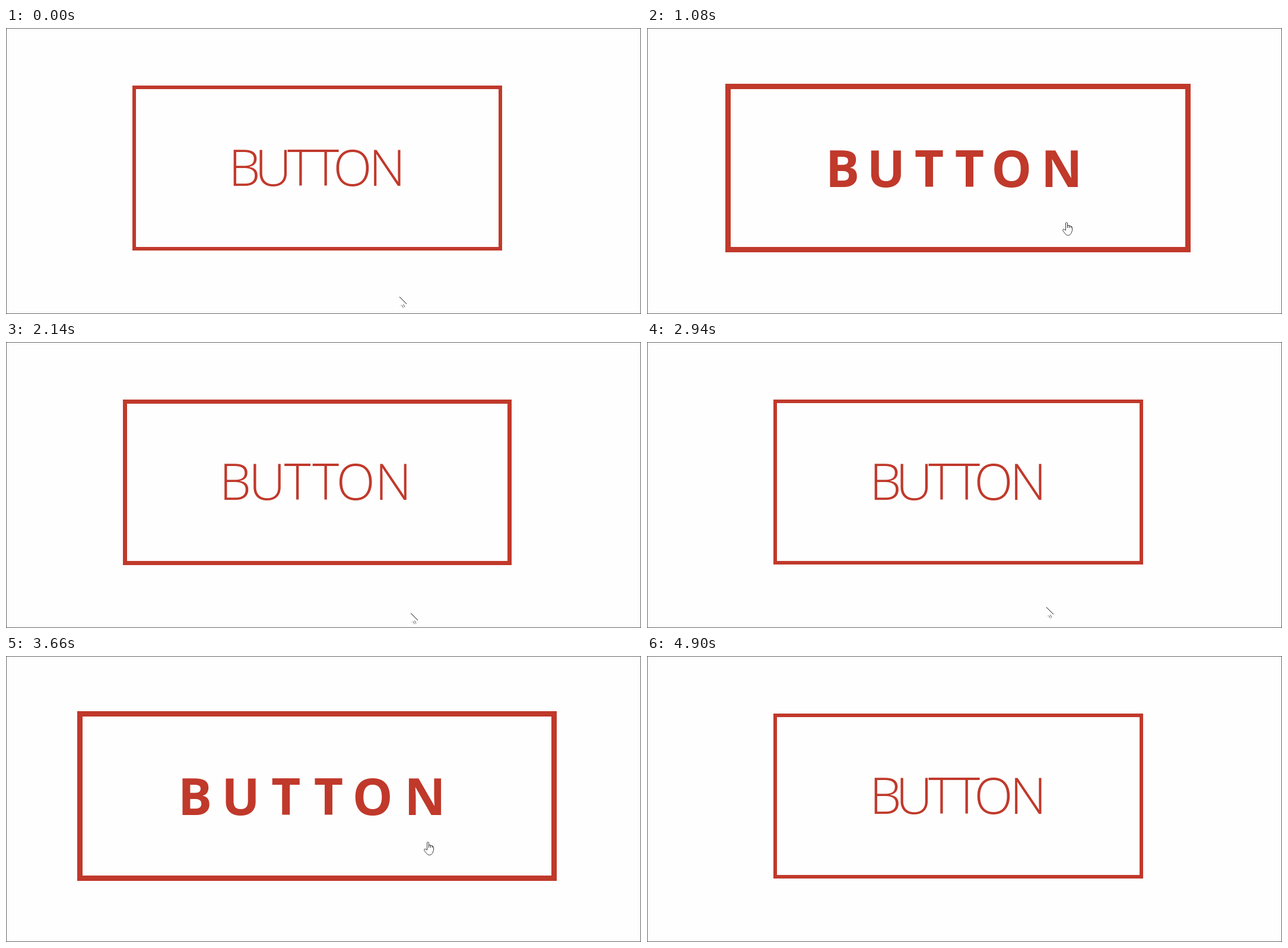
An HTML page with a canvas that plays this animation: 1070 by 482 pixels, repeating every 5.33 s.

```html
<!DOCTYPE html>
<html lang="en">
<head>
<meta charset="utf-8">
<title>Button hover</title>
<style>
  html, body { margin: 0; width: 100%; height: 100%; overflow: hidden; background: #fefefe; }
  canvas { display: block; }
</style>
</head>
<body>
<canvas id="stage" width="1070" height="482"></canvas>
<script>
const ctx = document.getElementById('stage').getContext('2d');
const LOOP = 5330;
const FADE = 400;
const RED = '#c0392b';
const PAPER = '#fefefe';

// Each leg is one pointer move, held for `step` ms per tick.
// Path points are [tick, x, y]; the pointer leaves the stage after an outward leg.
const legs = [
  { start: 445, step: 127, enter: true, hoverAt: 847, path: [[0, 663, 453], [5, 700, 327], [8, 718, 295]] },
  { start: 1750, step: 120, enter: false, hoverAt: 1900, path: [[0, 708, 350], [1, 697, 403], [3, 682, 457]] },
  { start: 2940, step: 150, enter: true, hoverAt: 3168, path: [[0, 673, 447], [1, 687, 379], [3, 704, 313]] },
  { start: 4090, step: 135, enter: false, hoverAt: 4280, path: [[0, 706, 318], [2, 929, 429], [5, 939, 433]] }
];

const LABEL = 'BUTTON';
const centres = [408, 454.5, 501, 543.3, 588.4, 647];
const SPACING = 29.5;

const mix = (a, b, k) => a + (b - a) * k;
const clamp = (v, lo, hi) => Math.min(hi, Math.max(lo, v));

// The CSS "ease" curve: cubic-bezier(.25, .1, .25, 1)
function ease(u) {
  const bezier = (a, b, s) => 3 * a * s * (1 - s) ** 2 + 3 * b * s * s * (1 - s) + s ** 3;
  let lo = 0, hi = 1;
  for (let i = 0; i < 20; i++) {
    const mid = (lo + hi) / 2;
    if (bezier(.25, .25, mid) < u) lo = mid;
    else hi = mid;
  }
  return bezier(.1, 1, lo);
}

function hoverAmount(leg, time) {
  const e = ease(clamp((time - leg.hoverAt) / FADE, 0, 1));
  return leg.enter ? e : 1 - e;
}

function pointerAt({ path, enter }, tick) {
  const last = path[path.length - 1];
  if (tick > last[0] && !enter) return null;
  const n = Math.min(tick, last[0]);
  const i = Math.max(1, path.findIndex(point => point[0] >= n));
  const [n0, x0, y0] = path[i - 1];
  const [n1, x1, y1] = path[i];
  const k = (n - n0) / (n1 - n0);
  return [Math.round(mix(x0, x1, k)), Math.round(mix(y0, y1, k))];
}

function drawBox(p) {
  const left = Math.round(213 - 93 * p);
  const right = Math.round(836 + 92 * p);
  const top = Math.ceil(97 - 4.1 * p);
  const bottom = Math.round(375 + 3.8 * p);
  const w = Math.round(6 + 3 * p);
  ctx.strokeStyle = RED;
  ctx.lineWidth = w;
  ctx.strokeRect(left + w / 2, top + w / 2, right - left - w, bottom - top - w);
}

function drawLabel(p) {
  const weight = clamp(Math.round(1 + 8 * p) * 100, 300, 700);
  const k = (weight - 300) / 400;
  const y = mix(266, 268.3, k);
  ctx.font = `${weight} 85.5px "Open Sans", "Noto Sans", sans-serif`;
  ctx.fillStyle = RED;
  [...LABEL].forEach((letter, i) => {
    const m = ctx.measureText(letter);
    const inkCentre = (m.actualBoundingBoxRight - m.actualBoundingBoxLeft) / 2;
    const x = centres[i] - 4.6 * (1 - k) + (i - 3) * SPACING * p;
    ctx.fillText(letter, x - inkCentre, y);
  });
}

function stroke(d, color) {
  ctx.strokeStyle = color;
  ctx.stroke(new Path2D(d));
}

function drawArrow() {
  stroke('M0 0L12 12', '#111');
  stroke('M.5 15.5L3.5 13.5', '#ccc');
  stroke('M4 14L6.5 18.5M6.5 12.5L9 17.5', '#555');
}

function drawHand() {
  const outline = 'M5.5 14V1.5Q7 -.5 8.5 1.5V5.5L11.5 6L14.5 7L16.5 8.5V14.5' +
    'L14.5 19.5Q13 22.5 9.5 22.5Q6.5 22.5 4.5 19.5L.7 14.5Q.3 12 2.5 12Z';
  ctx.fillStyle = PAPER;
  ctx.fill(new Path2D(outline));
  stroke(outline, '#3a3a44');
  stroke('M8.5 5V10M11.5 6V10M14.5 7V10', '#222');
}

function drawPointer([x, y]) {
  const overButton = y < 375;
  ctx.save();
  ctx.translate(x, y);
  ctx.lineWidth = 1;
  if (overButton) drawHand();
  else drawArrow();
  ctx.restore();
}

function draw(t) {
  const leg = legs.findLast(l => l.start <= t) || legs[0];
  const tick = Math.max(0, Math.floor((t - leg.start) / leg.step));
  const p = hoverAmount(leg, leg.start + tick * leg.step);
  const pointer = pointerAt(leg, tick);
  ctx.fillStyle = PAPER;
  ctx.fillRect(0, 0, 1070, 482);
  ctx.strokeStyle = '#666';
  ctx.lineWidth = 1;
  ctx.strokeRect(.5, .5, 1069, 481);
  drawBox(p);
  drawLabel(p);
  if (pointer) drawPointer(pointer);
}

const start = performance.now();
function tick() {
  draw((performance.now() - start) % LOOP);
  requestAnimationFrame(tick);
}
tick();
</script>
</body>
</html>
```
